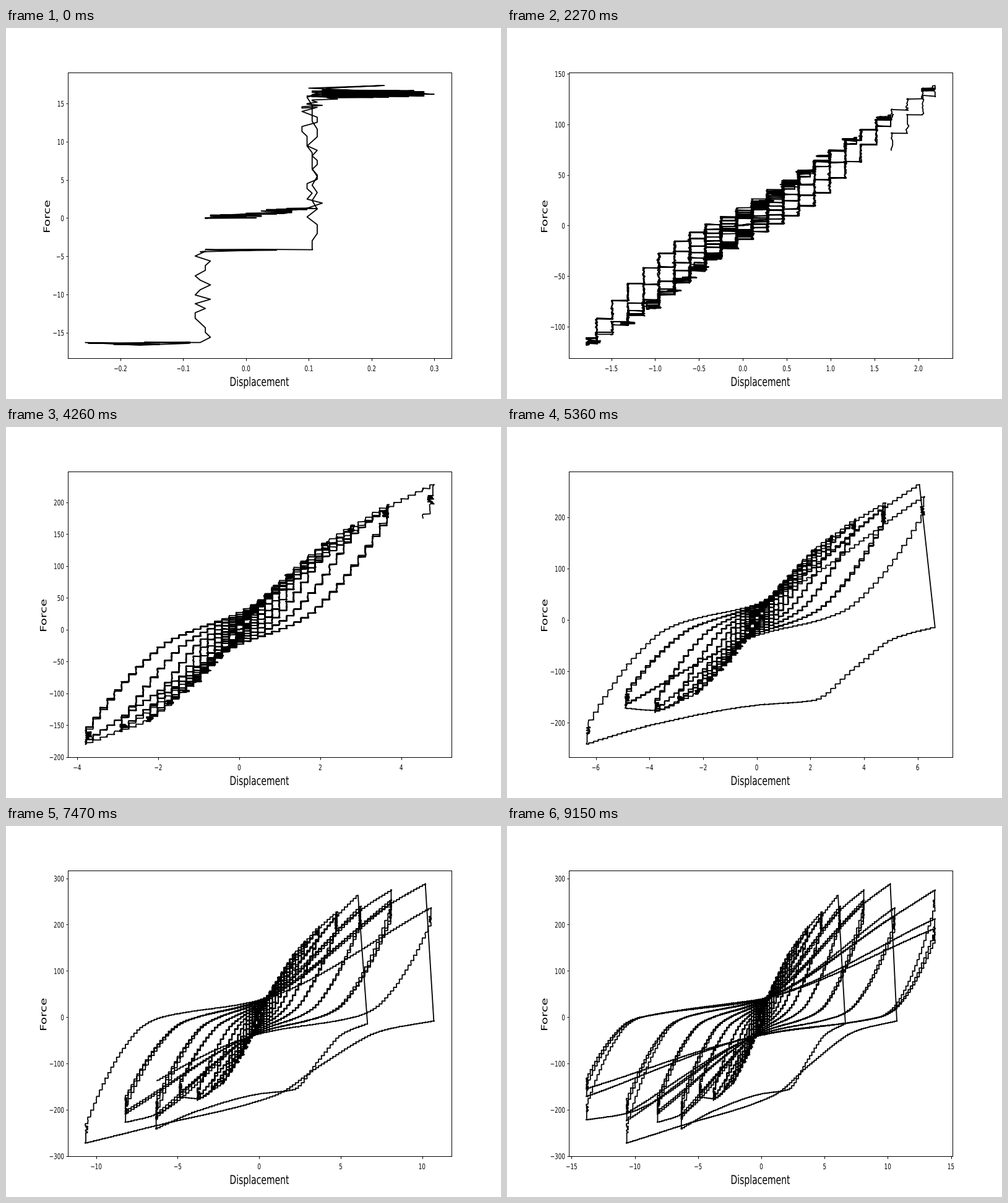
A matplotlib script that plays this animation: 800 by 600 pixels, repeating every 9.27 s.

```python
import numpy as np
import matplotlib as mpl
import matplotlib.pyplot as plt
from matplotlib.animation import FuncAnimation
from matplotlib.patches import PathPatch
from matplotlib.path import Path
from matplotlib.textpath import TextPath
from matplotlib.ticker import MaxNLocator
from matplotlib.transforms import Affine2D

mpl.rcParams["font.family"] = "DejaVu Sans"
mpl.rcParams["agg.path.chunksize"] = 5000

LOOP, TICK, STEPS = 9270, 30, 93
PITCH, SHIFT, QUANT = 0.177, 0.105, 0.0081  # actuator step, offset, resolution
LEVELS, CYCLES, GROWTH, LARGEST = 15, 3, 1.3, 13.74
ASPECT = 0.702  # glyph width to height ratio of the wide canvas
rng = np.random.default_rng(12)

# Levels where the specimen cracks, with the way back after the loss of force
CRACKS = {
    11: [(6.65, -14), (5.1, -37), (3.7, -92), (2.1, -157), (0, -166), (-3.8, -203)],
    13: [(10.75, -8), (7.5, -30), (3.9, -101), (1, -169), (-6.5, -236)],
}


def push_force(d):
    return np.interp(d, [0, 1, 2.2, 3.65, 4.85, 6.1, 8.1, 10.2, 13.7],
                     [0, 70, 139, 195, 229, 265, 275, 289, 275])


def pull_force(d):
    return np.interp(d, [0, 1.1, 2.3, 3.8, 4.9, 6.3, 8.2, 10.7, 13.8],
                     [0, 83, 145, 180, 171, 242, 227, 273, 222])


def peak(level, cycle, side):
    """Displacement and force at the end of a half cycle."""
    d = LARGEST / GROWTH ** (LEVELS - 1 - level)
    tired = 1 - 0.0016 * d * d
    if level in CRACKS:
        tired *= 0.93
    keep = (1, 0.25 + 0.75 * tired, tired)[cycle]
    if side > 0:
        if level in CRACKS and cycle == 0:
            d *= 0.97
        return d, push_force(d) * keep
    d += 0.1
    return -d, -pull_force(d) * keep


def smooth(px, py, x):
    """Cubic curve through the points without overshoot."""
    h = np.diff(px)
    d = np.diff(py) / h
    m = np.concatenate([d[:1], np.zeros(len(d) - 1), d[-1:]])
    same = d[:-1] * d[1:] > 0
    m[1:-1][same] = 2 * (d[:-1] * d[1:])[same] / (d[:-1] + d[1:])[same]
    i = np.clip(np.searchsorted(px, x, "right") - 1, 0, len(h) - 1)
    t = (x - px[i]) / h[i]
    return ((1 + 2 * t) * (1 - t) ** 2 * py[i] + t * (1 - t) ** 2 * h[i] * m[i]
            + t * t * (3 - 2 * t) * py[i + 1] - t * t * (1 - t) * h[i] * m[i + 1])


def loss(a):
    return 0.015 + 0.12 * min(1, abs(a) / 5) ** 2


def way(a, fa, b, fb, via):
    """Points of one half cycle: unloading, flat slip, reloading."""
    size = abs(a)
    u = np.linspace(0, 1, 5)
    knee = a * (0.13 + 0.04 * size)
    power = min(1.8, 1.25 + 0.07 * size)
    pts = list(zip(a + u * (knee - a), fa * (1 - loss(a)) * (1 - u) ** power))
    slip = 3 + 38 * (1 - np.exp(-max(size, abs(b)) / 5))
    return pts + [(0, np.sign(b) * min(slip, 0.4 * abs(fb)))] + via + [(b, fb)]


xs, ys = [], []


def add(x, y):
    xs.extend(np.atleast_1d(x))
    ys.extend(np.atleast_1d(y))


def band(lo, hi, f0, f1, n):
    """Noisy samples in a displacement range while the force drifts."""
    lo, hi = (np.linspace(*np.broadcast_to(v, 2), n) for v in (lo, hi))
    x = lo + (hi - lo) * rng.random(n)
    add(QUANT * np.round(x / QUANT),
        np.linspace(f0, f1, n) + rng.normal(0, 0.05, n))


def stairs(pts):
    """Follow the points in level moves joined by upright changes of force."""
    px, py = np.array(pts, float).T
    a, b = px[0], px[-1]
    lo, hi = min(a, b), max(a, b)
    s = np.sign(b - a)
    per_step = 14 if abs(b) < 2.5 else 6
    d = np.linspace(a, b, int((hi - lo) / PITCH * per_step) + 2)
    level = SHIFT + PITCH * np.round((d - SHIFT) / PITCH)
    at = level + np.clip(1.4 * (d - level), -PITCH / 2, PITCH / 2)
    f = smooth(px * s, py, np.clip(at, lo, hi) * s)
    jitter = QUANT * np.round(rng.normal(0, 0.9, len(d)))
    add(np.clip(level + jitter, lo, hi), f + rng.normal(0, 0.25, len(d)))


def hold(b, fb):
    """Pause at a peak, where the force relaxes."""
    s, r, n = np.sign(b), loss(b), 22
    add(b, fb)
    add(np.full(4, b - s * 0.03), fb * (1 - r * np.linspace(0.1, 0.6, 4)))
    add(b - s * rng.uniform(0, 0.165, n),
        fb * (1 - r * np.linspace(0.6, 1, n)) + rng.normal(0, 0.25, n))


# First small cycle
band((-0.09, 0.06), (0.02, 0.115), 0, 1.3, 45)
band(0.09, 0.12, 1.3, 14.5, 22)
band(0.09, (0.12, 0.17), 14.5, 15.7, 10)
band(0.1, 0.285, 15.8, 16.7, 75)
add([0.2995, 0.1, 0.22, 0.13], [16.2, 17, 17.35, 17])
band(0.096, 0.116, 15.8, -4, 20)
add(0.106, -4.15)
band(-0.08, 0.05, -4.1, -4.3, 7)
band(-0.086, -0.055, -4.4, -16.2, 20)
band(-0.25, -0.09, -16.3, -16.5, 8)
add([-0.256, -0.17, -0.09], [-16.3, -16.65, -16.4])

pos = (-0.25, -16.4)
ends = [len(xs)]
for level in range(LEVELS):
    for cycle in range(CYCLES):
        fresh = level > 0 and cycle == 0
        for side in (1, -1):
            end = peak(level, cycle, side)
            via = [peak(level - 1, 2, side)] if fresh else []
            cracked = fresh and level in CRACKS
            if cracked and side < 0:
                stairs(CRACKS[level] + [end])
            else:
                stairs(way(*pos, *end, via))
            if not (cracked and side > 0):
                hold(*end)
            pos = end
            ends.append(len(xs))
stairs(way(*pos, *peak(LEVELS - 1, 2, 1), [])[:6])
ends.append(len(xs))
X, Y = np.array(xs), np.array(ys)

# Half cycles done and time passed at a few redraws
halves = np.interp([0, 26, 43.12, 61.03, 76, 85.89, 91], range(len(ends)), ends)
COUNT = np.interp(range(STEPS), [0, 17, 30, 50, 70, 85, 92], halves).astype(int)
TIMES = np.interp(range(STEPS), [0, 14, 27, 36, 47, 65, 92],
                  [0, 920, 2000, 2830, 3930, 5910, 9150])

fig = plt.figure(figsize=(8, 6), dpi=100, facecolor="white")
ax = fig.add_axes([0.125, 0.11, 0.775, 0.77])
line, = ax.plot([], [], color="black", lw=1.3)
for spine in ax.spines.values():
    spine.set_linewidth(0.72)
for axis in (ax.xaxis, ax.yaxis):
    axis.set_major_locator(MaxNLocator(9, steps=[1, 2, 2.5, 5, 10]))
ax.tick_params(width=0.72, labelbottom=False, labelleft=False)
ax.tick_params(axis="x", length=3.2)
ax.tick_params(axis="y", length=2.3)

glyphs = {}


def word(text, size):
    if (text, size) not in glyphs:
        path = TextPath((0, 0), text, size=size)
        box = path.get_extents()
        glyphs[text, size] = path, box.x0, box.x1
    return glyphs[text, size]


def place(text, size, x, y, align="center", turn=False):
    path, x0, x1 = word(text, size)
    move = Affine2D().translate(-(x1 if align == "right" else (x0 + x1) / 2), 0)
    if turn:
        move.rotate_deg(90)
    return path.transformed(move.scale(ASPECT, 1).translate(x, y))


text_ink = PathPatch(Path([(0, 0)]), fc="black", lw=0, transform=None)
fig.add_artist(text_ink)


def marked(axis, lo, hi):
    vals = [v for v in axis.get_majorticklocs() if lo <= v <= hi]
    texts = axis.get_major_formatter().format_ticks(vals)
    return [((v - lo) / (hi - lo), t) for v, t in zip(vals, texts)]


def limits(v):
    lo, hi = v.min(), v.max()
    pad = 0.05 * (hi - lo)
    return lo - pad, hi + pad


def update(i):
    step = np.searchsorted(TIMES, (i + 1) * TICK, "right") - 1
    n = COUNT[step]
    line.set_data(X[:n], Y[:n])
    xl, yl = limits(X[:n]), limits(Y[:n])
    ax.set_xlim(xl)
    ax.set_ylim(yl)
    across = [place(t, 12.5, 100 + 620 * u, 45)
              for u, t in marked(ax.xaxis, *xl)]
    up = [place(t, 12.5, 93.3, 66 + 462 * u - 5, "right")
          for u, t in marked(ax.yaxis, *yl)]
    left = min(p.get_extents().x0 for p in up)
    text_ink.set_path(Path.make_compound_path(
        *across, *up, place("Displacement", 19.9, 410, 21),
        place("Force", 19.9, left - 5.5, 295.5, turn=True)))
    return line, text_ink


anim = FuncAnimation(fig, update, frames=LOOP // TICK, interval=TICK,
                     init_func=lambda: update(0), repeat=True, repeat_delay=0,
                     blit=False, cache_frame_data=False)
plt.show()
```
